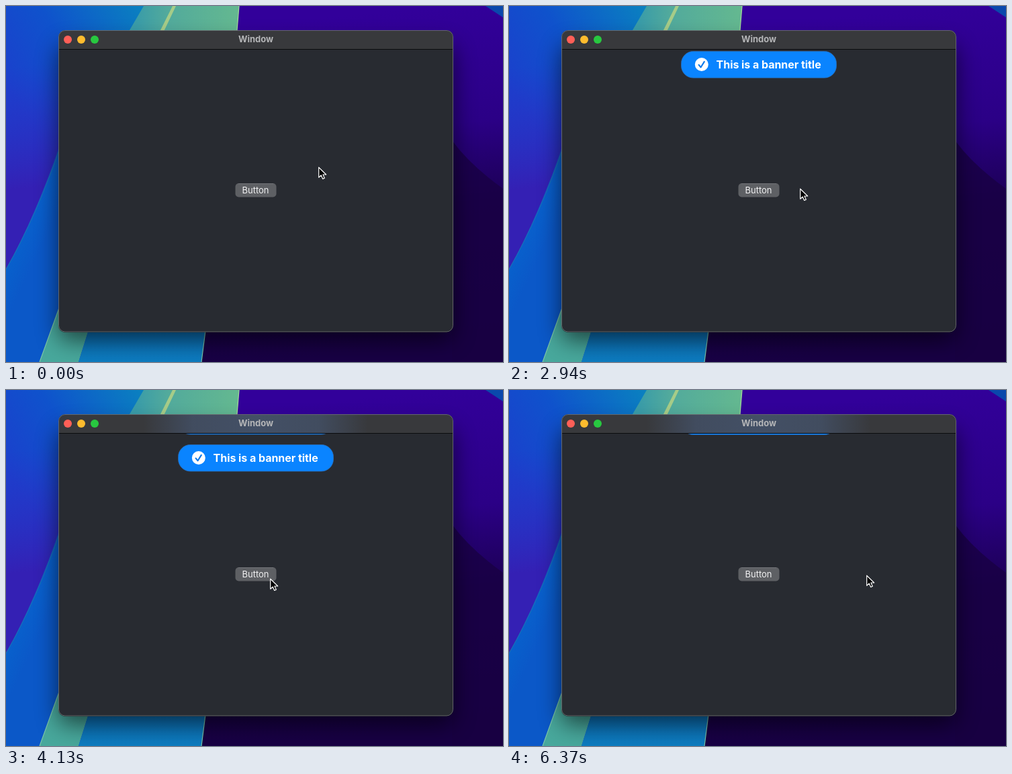
Animation of 740 by 530 pixels, one loop 6440 ms. Source, as an HTML page:

```html
<!DOCTYPE html>
<html lang="en">
<head>
<meta charset="utf-8">
<title>Banner</title>
<style>
  html, body { margin: 0; width: 100%; height: 100%; overflow: hidden; background: #16004a; }
  svg { display: block; width: 740px; height: 530px; }
  text { font-family: Inter, "Liberation Sans", sans-serif; }
</style>
</head>
<body>
<svg viewBox="0 0 740 530">
  <defs>
    <linearGradient id="blue" gradientUnits="userSpaceOnUse" x1="0" y1="120" x2="200" y2="0">
      <stop offset="0" stop-color="#1b40cc"/>
      <stop offset=".45" stop-color="#0f52cc"/>
      <stop offset="1" stop-color="#0a80c0"/>
    </linearGradient>
    <linearGradient id="purple" gradientUnits="userSpaceOnUse" x1="20" y1="90" x2="40" y2="270">
      <stop offset="0" stop-color="#2a30c8" stop-opacity="0"/>
      <stop offset="1" stop-color="#3420b4"/>
    </linearGradient>
    <linearGradient id="ribbon" gradientUnits="userSpaceOnUse" x1="20" y1="320" x2="62" y2="340">
      <stop offset="0" stop-color="#0f66b8"/>
      <stop offset=".3" stop-color="#0860cc"/>
      <stop offset="1" stop-color="#0b58c8"/>
    </linearGradient>
    <linearGradient id="low" x1="0" y1="0" x2="0" y2="1">
      <stop offset="0" stop-color="#0b6cb4"/>
      <stop offset="1" stop-color="#0d7cc0"/>
    </linearGradient>
    <linearGradient id="green" gradientUnits="userSpaceOnUse" x1="195" y1="0" x2="345" y2="0">
      <stop offset="0" stop-color="#3a9ca8"/>
      <stop offset=".3" stop-color="#52aa9c"/>
      <stop offset="1" stop-color="#64b890"/>
    </linearGradient>
    <linearGradient id="violet" gradientUnits="userSpaceOnUse" x1="640" y1="0" x2="690" y2="500">
      <stop offset="0" stop-color="#32009a"/>
      <stop offset=".35" stop-color="#2b0086"/>
      <stop offset=".6" stop-color="#1b0052"/>
      <stop offset="1" stop-color="#180044"/>
    </linearGradient>
    <linearGradient id="tintFill">
      <stop offset="0" stop-color="#435066" stop-opacity="0"/>
      <stop offset=".22" stop-color="#435066" stop-opacity=".85"/>
      <stop offset=".5" stop-color="#435066"/>
      <stop offset=".78" stop-color="#435066" stop-opacity=".85"/>
      <stop offset="1" stop-color="#435066" stop-opacity="0"/>
    </linearGradient>
    <filter id="soft" x="-20%" y="-20%" width="140%" height="140%"><feGaussianBlur stdDeviation="17"/></filter>
    <clipPath id="content"><path d="M79 65H665V476q0 9-9 9H88q-9 0-9-9z"/></clipPath>
    <g id="banner">
      <rect x="256.5" y=".5" width="231" height="39.5" rx="18" fill="#0a84ff" stroke="#2a6db8" stroke-width=".8"/>
      <circle cx="286.8" cy="20" r="10" fill="#fff"/>
      <path d="M282.6 20.6l3 3.7 5.2-8.4" fill="none" stroke="#0a78ea" stroke-width="2.1" stroke-linecap="round" stroke-linejoin="round"/>
      <text x="308.6" y="25.7" font-size="16" font-weight="700" letter-spacing="-.05" fill="#fff">This is a banner title</text>
    </g>
  </defs>

  <!-- wallpaper -->
  <rect width="740" height="530" fill="url(#violet)"/>
  <path d="M664 200Q690 236 740 272V530H664z" fill="#180042" opacity=".75"/>
  <path d="M714 0H740V17z" fill="#0a48ac"/>
  <path d="M0 0H346L291 530H0z" fill="url(#blue)"/>
  <path d="M0 60H110V212H78Q44 312 0 392z" fill="url(#purple)"/>
  <path d="M84 200Q46 312 0 392V530H100V200z" fill="url(#ribbon)"/>
  <path d="M84 200Q46 312 0 392" fill="none" stroke="#1a78b0" stroke-width="1"/>
  <path d="M205 0H347L342 60H170z" fill="url(#green)"/>
  <path d="M248 0h5l-21 44h-6z" fill="#a6cc88"/>
  <path d="M347 0L342 60" stroke="#a4d89c" stroke-width="1.2"/>
  <path d="M80 447L50 530H108L130 460z" fill="#48a89c"/>
  <path d="M130 460L108 530H291L300 460z" fill="url(#low)"/>
  <path d="M80 447L50 530M300 460L291 530" stroke="#7cc4a8" stroke-width="1.2"/>

  <!-- window -->
  <rect x="78" y="58" width="588" height="440" rx="14" fill="#000" opacity=".58" filter="url(#soft)"/>
  <rect x="78" y="36" width="588" height="450" rx="10" fill="#07080a" opacity=".7"/>
  <rect x="78.5" y="36.5" width="587" height="448.5" rx="9.5" fill="#282b31"/>
  <path d="M79 64V46q0-9 9-9H656q9 0 9 9V64z" fill="#38393c"/>
  <rect id="tint" x="205" y="37" width="334" height="27" fill="url(#tintFill)"/>
  <path d="M79 64.5H665" stroke="#0b0c0e"/>
  <rect x="78.5" y="36.5" width="587" height="448.5" rx="9.5" fill="none" stroke="#8a8e90" stroke-opacity=".65"/>
  <circle cx="92" cy="50" r="6" fill="#ff5f57"/>
  <circle cx="112" cy="50" r="6" fill="#febc2e"/>
  <circle cx="132" cy="50" r="6" fill="#28c840"/>
  <text x="372" y="54" font-size="13" font-weight="700" text-anchor="middle" fill="#b5b6b8">Window</text>
  <rect x="341.5" y="264" width="61" height="20.5" rx="5" fill="#5e6064"/>
  <path d="M346 264.5H398" stroke="#727478"/>
  <text x="371.5" y="278.6" font-size="13" text-anchor="middle" fill="#f2f2f3">Button</text>

  <g clip-path="url(#content)">
    <use href="#banner" class="slot"/>
    <use href="#banner" class="slot"/>
  </g>
  <path id="cursor" d="M.7 1.2V16.2L4.2 13 6.7 18.4 9.3 17.2 6.9 12H11.7z" fill="#000" stroke="#fff" stroke-width="1.2" stroke-linejoin="round"/>
</svg>
<script>
const LOOP = 6440, STEP = 70;
const SHOWN = 84, HIDDEN = 24;
const EXIT_STEPS = 4;

const tint = document.getElementById('tint');
const cursor = document.getElementById('cursor');
const slots = document.querySelectorAll('.slot');

// Steps at which each banner enters and leaves, and its slot
const banners = [
  { slot: 0, enter: 10, leave: 42 },
  { slot: 0, enter: 54, leave: 56 },
  { slot: 1, enter: 56, leave: 88 }
];

// Pointer moves: first step, number of steps, end point
const moves = [
  { at: 1, steps: 4, x: 385, y: 277 },
  { at: 20, steps: 4, x: 433, y: 271 },
  { at: 46, steps: 4, x: 393, y: 280 },
  { at: 76, steps: 3, x: 532, y: 275 }
];

const clamp = v => Math.max(0, Math.min(1, v));
const mix = (a, b, k) => a + (b - a) * k;

// Critically damped spring from 0 to 1
const spring = (ms, rate) => {
  const p = rate * ms / 1000;
  return 1 - Math.exp(-p) * (1 + p);
};

const entering = (b, step) => mix(HIDDEN, SHOWN, spring((step - b.enter + 1) * STEP, 17));

function bannerTop(b, step) {
  if (step < b.enter || step >= b.leave + EXIT_STEPS) return null;
  if (step < b.leave) return entering(b, step);
  return mix(entering(b, b.leave), HIDDEN, spring((step - b.leave) * STEP + 57, 18.5));
}

function pointer(step) {
  let x = 465, y = 239;
  for (const m of moves) {
    const k = clamp((step - m.at + 1) / m.steps);
    const e = 1 - (1 - k) ** 2;
    x = mix(x, m.x, e);
    y = mix(y, m.y, e);
  }
  return [Math.round(x), Math.round(y)];
}

function draw(ms) {
  const step = Math.floor(ms % LOOP / STEP);
  let glow = 0;
  slots.forEach(s => s.setAttribute('visibility', 'hidden'));
  for (const b of banners) {
    const top = bannerTop(b, step);
    if (top === null) continue;
    slots[b.slot].setAttribute('visibility', 'visible');
    slots[b.slot].setAttribute('transform', `translate(0 ${Math.round(top * 2) / 2})`);
    glow = Math.max(glow, clamp((54 - top) / 28));
  }
  tint.setAttribute('opacity', glow);
  cursor.setAttribute('transform', `translate(${pointer(step).join(' ')})`);
}

const start = performance.now();
function tick() {
  draw(performance.now() - start);
  requestAnimationFrame(tick);
}
tick();
</script>
</body>
</html>
```
